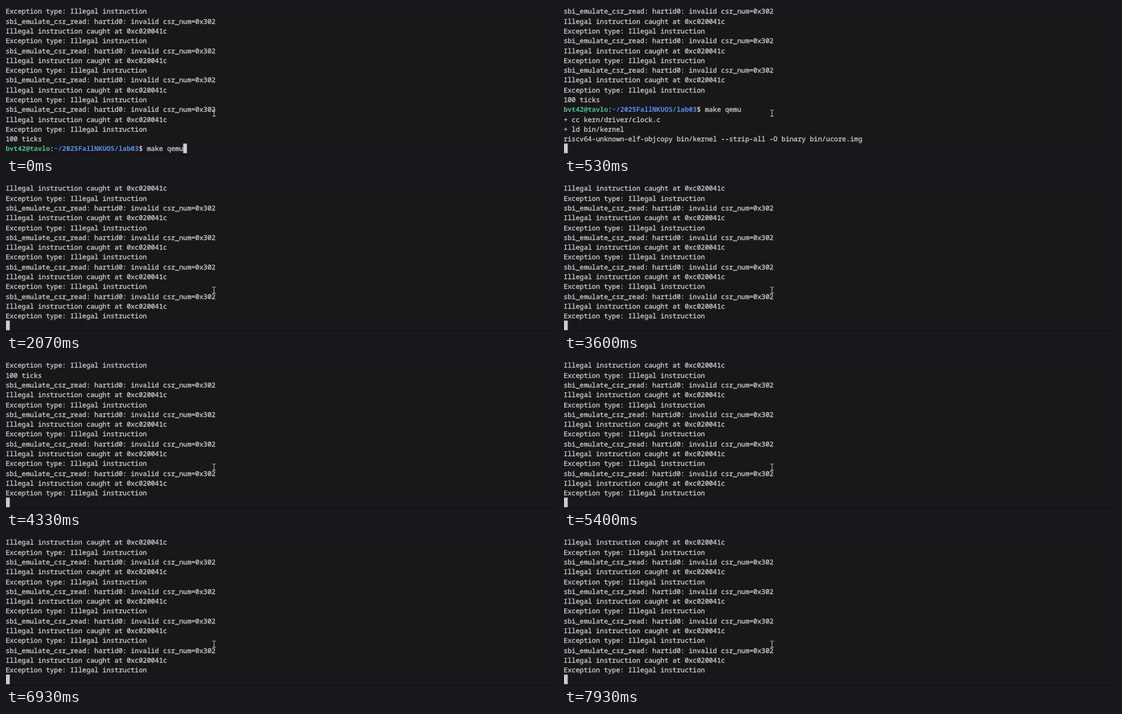
Recreate the animation shown at these times as an HTML page with a canvas. Size 800 px wide and 217 px high, loop 8 s.

```html
<!DOCTYPE html>
<html lang="en">
<head>
<meta charset="utf-8">
<title>Terminal</title>
<style>
  html, body { margin: 0; width: 100%; height: 100%; overflow: hidden; background: #18171a; }
  canvas { display: block; }
</style>
</head>
<body>
<canvas id="term" width="800" height="217"></canvas>
<script>
const ctx = document.getElementById('term').getContext('2d');

const LOOP = 8000, FRAME = 1000 / 15;
const ROWS = 15, CELL = 5.85, PITCH = 14.29, LEFT = -0.6, BASELINE = 11.4;
const BG = '#18171a', EDGE = '#101014';
const FG = '#cccccc', GREEN = '#4fc08d', BLUE = '#5a8ee6';
const FONT = '9.75px "Noto Sans Mono", "DejaVu Sans Mono", monospace';

// A line is a list of [text, colour, bold] spans.
const plain = text => [[text, FG]];
const TRAP = [
  'sbi_emulate_csr_read: hartid0: invalid csr_num=0x302',
  'Illegal instruction caught at 0xc020041c',
  'Exception type: Illegal instruction'
].map(plain);
const TICKS = plain('100 ticks');
const PROMPT = [
  ['bvt42@tavlo', GREEN, true], [':', FG],
  ['~/2025FallNKUOS/lab03', BLUE, true], ['$ make qemu', FG]
];
const BUILD = [
  [130, '+ cc kern/driver/clock.c'],
  [390, '+ ld bin/kernel'],
  [460, 'riscv64-unknown-elf-objcopy bin/kernel --strip-all -O binary bin/ucore.img']
];
const ENTER = 100;

// The kernel traps once per timer interrupt and reports every hundredth.
const TRAP_EVERY = 9.95, TRAP_SHIFT = 6.5, FIRST_TRAP = 80;

function screen(t) {
  const lines = [];
  for (let i = 0; i < 5; i++) lines.push(...TRAP);
  lines.push(TICKS, PROMPT);
  for (const [at, text] of BUILD) if (t >= at) lines.push(plain(text));

  const last = Math.floor((t - TRAP_SHIFT) / TRAP_EVERY);
  for (let n = Math.max(FIRST_TRAP, last - 5); n <= last; n++) {
    lines.push(...TRAP);
    if (n > 200 && n % 100 === 30) lines.push(TICKS);
  }
  if (t >= ENTER) lines.push([]);
  return lines.slice(-ROWS);
}

function drawLine(spans, row) {
  const y = Math.round(BASELINE + row * PITCH);
  let col = 0;
  for (const [text, colour, bold] of spans) {
    const x = LEFT + col * CELL;
    ctx.font = (bold ? 'bold ' : '') + FONT;
    ctx.fillStyle = ctx.strokeStyle = colour;
    ctx.fillText(text, x, y);
    // A hairline outline gives the regular weight its sturdier stems.
    if (!bold) ctx.strokeText(text, x, y);
    col += text.length;
  }
  return col;
}

function drawPointer() {
  ctx.fillStyle = '#b4b4b4';
  ctx.fillRect(301, 152, 1, 9);
  for (const y of [151, 160]) {
    ctx.fillRect(299, y, 2, 1);
    ctx.fillRect(302, y, 2, 1);
  }
}

function draw(t) {
  ctx.fillStyle = BG;
  ctx.fillRect(0, 0, 800, 217);
  ctx.fillStyle = EDGE;
  ctx.fillRect(0, 215, 800, 1);
  ctx.textRendering = 'geometricPrecision';
  ctx.lineWidth = 0.3;
  let col = 0;
  screen(t).forEach((line, row) => { col = drawLine(line, row); });
  ctx.fillStyle = FG;
  ctx.fillRect(Math.max(0, LEFT + col * CELL), 200.4, CELL - 0.4, 14);
  drawPointer();
}

const start = performance.now();
function play() {
  const t = (performance.now() - start) % LOOP;
  draw(Math.floor((t + 3.34) / FRAME) * FRAME % LOOP);
  requestAnimationFrame(play);
}
play();
</script>
</body>
</html>
```
